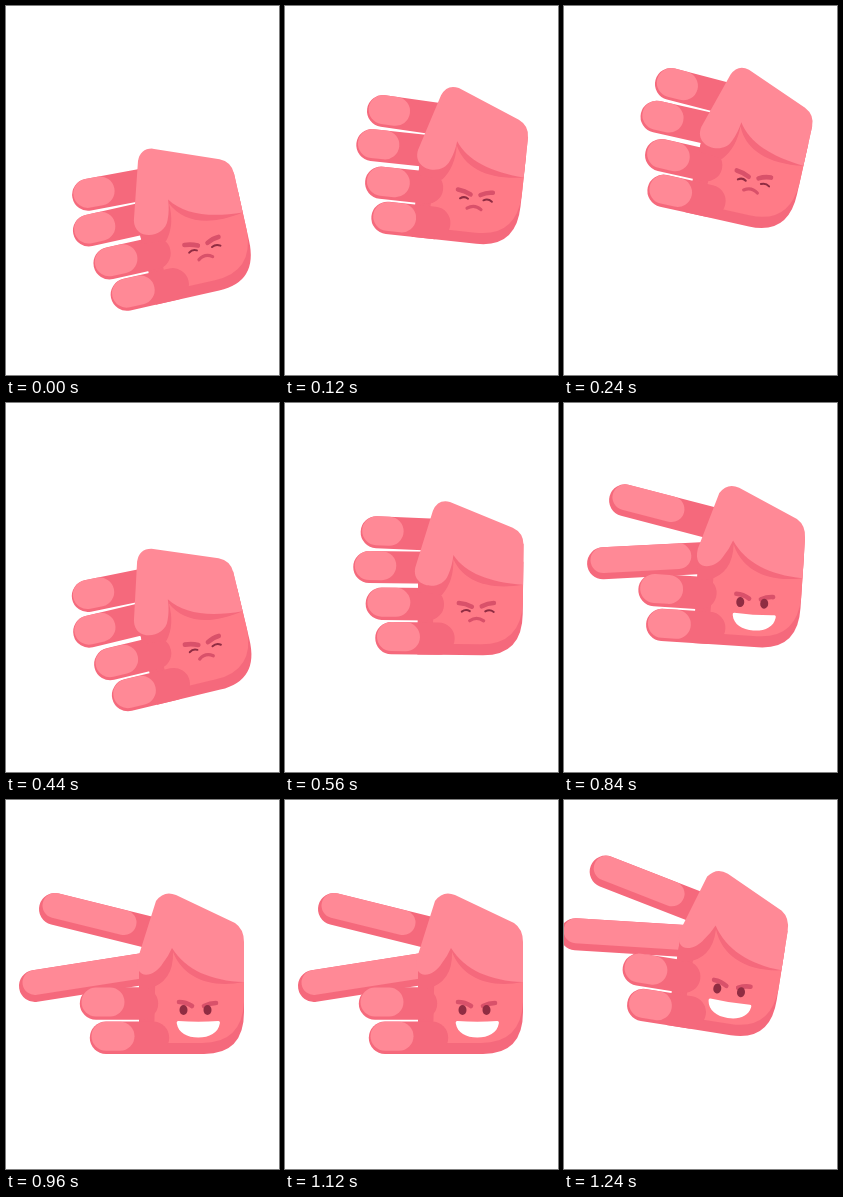
An HTML page with a canvas for the animation above (1.28 s loop, 273 px wide and 369 px high).

```html
<!DOCTYPE html>
<html lang="en">
<head>
<meta charset="utf-8">
<title>Hand game</title>
<style>
  html, body { margin: 0; width: 100%; height: 100%; overflow: hidden; background: #fff; }
  canvas { display: block; width: 273px; height: 369px; }
</style>
</head>
<body>
<canvas width="273" height="369"></canvas>
<script>
const ctx = document.querySelector('canvas').getContext('2d');
const LIGHT = '#ff8996', MID = '#ff7b87', DARK = '#f5697c', BROW = '#d9516a', EYE = '#8f2c42';
const LOOP = 1280, STEP = 40;
const WRIST = { x: 240, y: 189 }, LIFT = 105;
// [time, hand angle in degrees]
const SWING = [[-28, -13.6], [203, 14.1], [448, -13.6], [668, 14.1], [930, 0], [LOOP, 0]];

const mix = (a, b, k) => a + (b - a) * k;
const clamp = v => Math.min(1, Math.max(0, v));
const ease = p => (1 - Math.cos(Math.PI * clamp(p))) / 2;
const ramp = (t, from, to) => ease((t - from) / (to - from));

function handAngle(t) {
  const i = SWING.findIndex(key => key[0] > t);
  const [t0, a0] = SWING[i - 1], [t1, a1] = SWING[i];
  return mix(a0, a1, ramp(t, t0, t1));
}

function fill(path, color) {
  ctx.fillStyle = color;
  ctx.fill(new Path2D(path));
}

function stroke(path, color, width) {
  ctx.strokeStyle = color;
  ctx.lineWidth = width;
  ctx.stroke(new Path2D(path));
}

function capsule(x1, y1, x2, y2, r, color) {
  stroke(`M${x1} ${y1}L${x2} ${y2}`, color, r * 2);
}

// Fills the numbers of two equally built paths with their blend.
function morph(a, b, k) {
  const target = b.match(/[\d.]+/g);
  let i = 0;
  return a.replace(/[\d.]+/g, n => mix(+n, +target[i++], k));
}

// A finger that reaches out from the fist into a long pointing one.
function longFinger(fist, open, baseY, lightEnd, k) {
  const x = mix(fist[0], open[0], k), y = mix(fist[1], open[1], k * k);
  const end = mix(x + 12.5, lightEnd, k * k);
  const endY = mix(y, baseY, (end - x) / (150 - x));
  const lift = mix(1.5, 3.5, k), r = mix(14.5, 12.5, k);
  capsule(x, y, 150, baseY, 16, DARK);
  capsule(x, y - lift, end, endY - lift, r, LIGHT);
}

function curledFinger(x, y, length, lightLength) {
  capsule(x, y, x + length, y, 16.2, DARK);
  capsule(x, y - 1.5, x + lightLength, y - 1.5, 14.5, LIGHT);
}

function drawFace(k) {
  const frown = 1 - clamp(k * 2), grin = clamp(k * 2 - 0.6);
  stroke(morph('M174 202Q181 202.5 187 205.5M197 205Q203 201.5 209 201.5',
               'M173 202Q180 202 186 206M198 206Q204 203 210 203', k), BROW, 4.6);

  ctx.globalAlpha = frown;
  stroke('M177 210.5Q181 207.5 185 210M200.5 210Q205 207.5 209 210.5', EYE, 2);
  stroke('M185 219.5Q192 214.5 199 219.5', BROW, 3.2);
  ctx.globalAlpha = 1;

  if (!grin) return;
  for (const x of [177.5, 201.5]) {
    ctx.fillStyle = EYE;
    ctx.beginPath();
    ctx.ellipse(x, 210, 4, 5 * grin, 0, 0, 7);
    ctx.fill();
  }
  ctx.save();
  ctx.translate(192.3, 221);
  ctx.scale(grin, grin);
  fill('M-20 0Q0 1.5 20 0Q22 0 21.5 2.5C20 12 11 16.5 0 16.5S-20 12 -21.5 2.5Q-22 0 -20 0Z', '#fff');
  ctx.restore();
}

function drawHand(open, grin, close) {
  const curl = open * (1 - close);
  longFinger([91, 132], [49, mix(109, 112, close)], 134, 118, open);
  longFinger([84, 167], [29, mix(186, 178.5, close)], 167, 140, open);

  fill('M133 160H238V212Q238 254 198 254H133Z', DARK);
  fill('M150 142H238V202Q236 243 196 243H148Z', MID);
  curledFinger(mix(97, 90, curl), 203.5, 46, 14);
  curledFinger(mix(107, 100, curl), 237.8, 47, 14);

  // Shadow of the thumb and the back of the hand
  fill(morph('M238 183C203 189 178 180 168 158Q169 180 157 194L133 192V158L168 150Z',
             'M238 182C203 189 177 177 167 152Q168 182 142 189L133 189V158L166 145Z', open), DARK);
  fill(morph(
    'M147 110Q152 98 164 101L227 126Q238 131 238 143L238 183C205 181 180 172 168 154Q167 165 163 174C157 191 126 188 130 167Z',
    'M150 101Q158 90 170 95L229 123Q238 129 238 142L238 182C205 181 180 170 166 148Q162 157 157 163C149 177 128 182 132 158Z',
    open), LIGHT);
  drawFace(grin);
}

function draw(t) {
  const open = ramp(t, 675, 900);
  const grin = ramp(t, 690, 870);
  const thrust = clamp((t - 1160) / 80) ** 1.5;
  const angle = (handAngle(t) + 9 * thrust) * Math.PI / 180;

  ctx.fillStyle = '#fff';
  ctx.fillRect(0, 0, 273, 369);
  ctx.save();
  ctx.lineCap = 'round';
  ctx.translate(WRIST.x - 21.7 * thrust, WRIST.y + 5 * thrust - LIFT * Math.sin(angle));
  ctx.rotate(angle);
  ctx.translate(-WRIST.x, -WRIST.y);
  drawHand(open, grin, thrust);
  ctx.restore();
}

function tick() {
  draw(Math.floor(performance.now() % LOOP / STEP) * STEP);
  requestAnimationFrame(tick);
}
tick();
</script>
</body>
</html>
```
